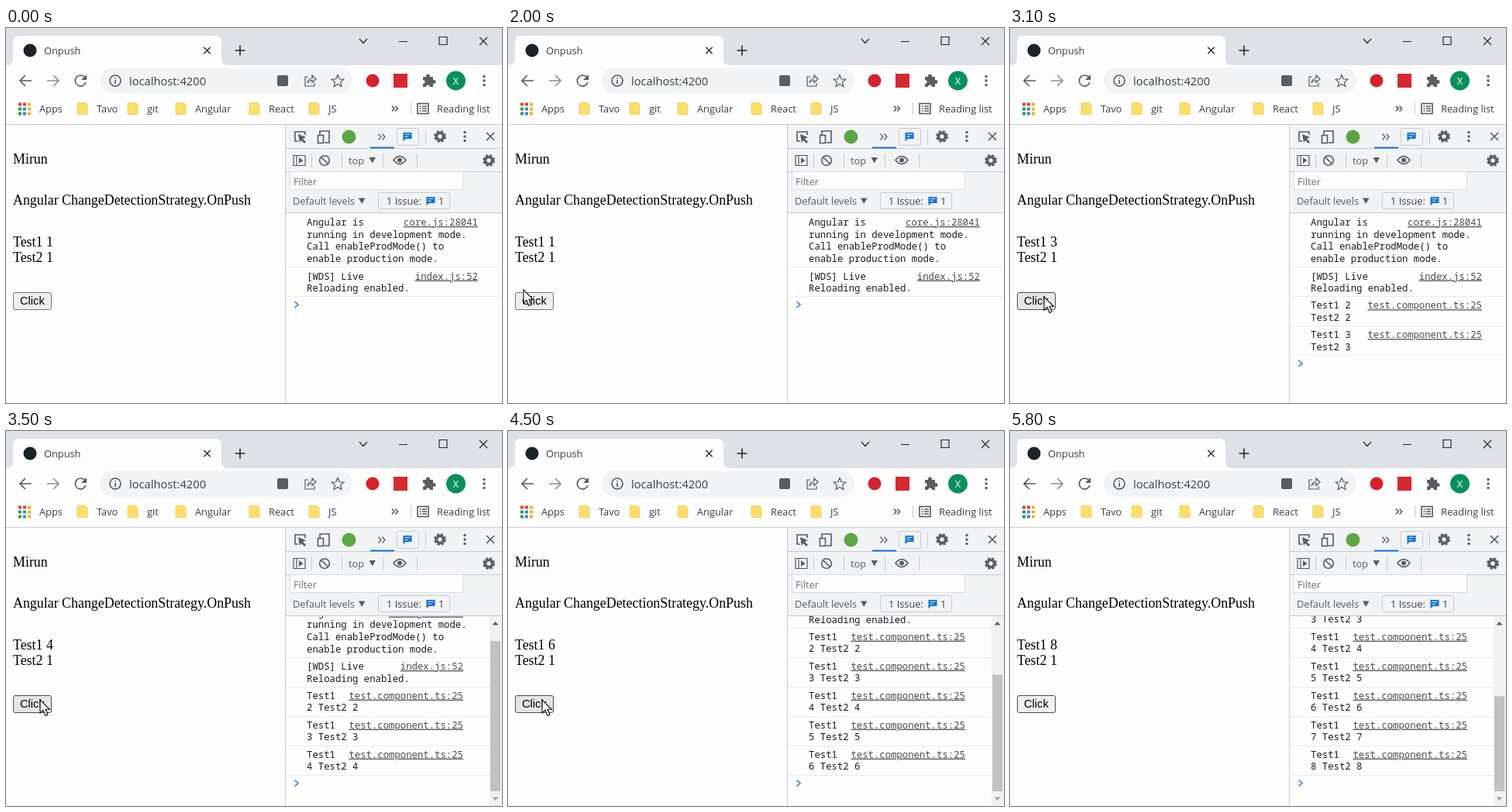
An HTML page that plays this animation: 640x484 px, repeating every 5.9 s.

```html
<!DOCTYPE html>
<html lang="en">
<head>
<meta charset="utf-8">
<title>Onpush</title>
<style>
  html, body { margin: 0; width: 100%; height: 100%; overflow: hidden; background: #fdfdfd; }
  svg { display: block; width: 640px; height: 484px; }
  text { white-space: pre; }
  .ui { font: 12.8px "Open Sans", "Noto Sans", sans-serif; fill: #3c4043; }
  .dev { fill: #5a5e63; }
  .page { font: 17.9px "Liberation Serif", "Times New Roman", serif; fill: #000; }
  .log { font: 12.3px "Noto Sans Mono", "DejaVu Sans Mono", monospace; fill: #1c1c20; }
  .link { fill: #4c4c52; text-anchor: end; text-decoration: underline; }
  .line { fill: none; stroke: #55595e; stroke-width: 1.6; }
  .thin { stroke-width: 1.2; }
  .dark { stroke: #26282c; }
  .pale { stroke: #8b8f94; }
  .rule { stroke: #c8cbd6; fill: none; }
  .fill { fill: #5a5e63; }
</style>
</head>
<body>
<svg viewBox="0 0 640 484">
  <defs>
    <path id="folder" d="M1 0H11V2H13V15H1Q0 15 0 14V1Q0 0 1 0Z" fill="#fbdf6c" stroke="#e8c95a" stroke-width=".8"/>
    <path id="chat" d="M0 0H12V9H4L0 12.5Z M2.5 2.8H9.5 M2.5 5.8H7" fill="#1a73c8" stroke="#f1f3f4" stroke-width=".9"/>
    <g id="gear">
      <circle r="6.3" fill="none" stroke="#5a5e63" stroke-width="3" stroke-dasharray="3.3 1.65"/>
      <circle r="4.4" fill="none" stroke="#5a5e63" stroke-width="3.4"/>
    </g>
    <g id="dots" class="fill"><circle cy="-5.5" r="1.7"/><circle r="1.7"/><circle cy="5.5" r="1.7"/></g>
    <path id="cross" d="M-5-5L5 5M5-5L-5 5"/>
    <clipPath id="consoleClip"><rect x="361" y="239" width="279" height="245"/></clipPath>
  </defs>

  <rect width="640" height="484" fill="#fdfdfd"/>

  <!-- Window frame and tab -->
  <rect width="640" height="48" fill="#dee1e6"/>
  <path d="M0 48Q9 48 9 40V18Q9 10 17 10H270Q278 10 278 18V40Q278 48 287 48Z" fill="#fdfdfd"/>
  <rect y="48" width="640" height="77" fill="#fdfdfd"/>
  <path class="rule" d="M0 124.5H640"/>
  <circle cx="31" cy="29" r="8.5" fill="#1c2328"/>
  <text class="ui" x="49" y="33.5">Onpush</text>
  <use href="#cross" class="line dark" transform="translate(259.5 29) scale(.84)"/>
  <path class="line dark" d="M295.5 29H308.5M302 22.5V35.5"/>
  <path class="line dark thin" d="M456 14L461 19.500L466 14M507 17.500H518M559 11.500H569V21.500H559Z"/>
  <use href="#cross" class="line dark thin" x="616" y="17"/>

  <!-- Address bar -->
  <path class="line" d="M33 68H18M25 61L18 68L25 75"/>
  <path class="line pale" d="M53 68H68M61 61L68 68L61 75"/>
  <path class="line" d="M102 64A7 7 0 1 0 103 70"/>
  <path class="fill" d="M104 60V67H97Z"/>
  <rect x="121" y="51.500" width="326" height="33" rx="16.500" fill="#f1f3f4"/>
  <circle class="line" cx="141" cy="68" r="7"/>
  <path class="line" d="M141 67V72M141 64V65.600"/>
  <text class="ui" style="font-size:14.700px" x="159" y="73.500">localhost:4200</text>
  <rect class="fill" x="350" y="61" width="14" height="14" rx="2"/>
  <path class="line thin" d="M390 63H386V75H398V71M389 71Q390 65 395 65V61L400 66L395 70.500V67.500Q391 67.500 389 71Z"/>
  <path class="line thin" d="M428 60.500L430.200 65.800L435.800 66.200L431.500 69.900L432.900 75.400L428 72.400L423.100 75.400L424.500 69.900L420.200 66.200L425.800 65.800Z"/>
  <circle cx="473" cy="68" r="8.500" fill="#d3222f"/>
  <rect x="500" y="59" width="18" height="18" fill="#d32a32"/>
  <path class="fill" d="M538 63H542V62A2.500 2.500 0 0 1 547 62V63H551V67H552A2.500 2.500 0 0 1 552 72H551V76H547A2.500 2.500 0 0 0 542 76H538V72A2.500 2.500 0 0 0 538 67Z"/>
  <circle cx="580.500" cy="68" r="12.500" fill="#0a8f5b"/>
  <text class="ui" x="580.500" y="72.500" text-anchor="middle" style="fill:#fff">X</text>
  <use href="#dots" x="617" y="68"/>

  <!-- Bookmarks -->
  <g id="apps"></g>
  <g id="bookmarks"></g>
  <path class="line" d="M498 100.500L501 104L498 107.500M502.500 100.500L505.500 104L502.500 107.500"/>
  <path class="rule" d="M522.500 96V112"/>
  <rect class="line" x="531" y="97.500" width="14" height="13"/>
  <path class="line" d="M533.500 101H535.500M537 101H543M533.500 104H535.500M537 104H543M533.500 107H535.500M537 107H543"/>
  <text class="ui" x="556" y="108.500">Reading list</text>

  <!-- Page -->
  <g class="page">
    <text x="9" y="175">Mirun</text>
    <text x="9" y="228">Angular ChangeDetectionStrategy.OnPush</text>
    <text id="count" x="9" y="282"></text>
    <text x="9" y="302">Test2 1</text>
  </g>
  <rect id="button" x="9.500" y="341.500" width="49" height="22" rx="2.500"/>
  <text x="18" y="357" style="font:14.670px 'Liberation Sans',Arial,sans-serif">Click</text>

  <!-- Developer tools -->
  <rect x="361" y="125" width="279" height="113" fill="#f1f3f4"/>
  <path class="rule" d="M360.500 125V484M361 155.500H640M361 185.500H640M361 238.500H640M541.500 131V150M394.500 162V180M433.500 162V180M486.500 162V180M530.500 162V180"/>
  <path class="line" d="M377 146H373V134H386V138"/>
  <path class="fill" d="M377 137L387 141L383 143L387 147L385 149L381 145L379 148Z"/>
  <path class="line" d="M405 139V133H417V148H411M402.500 138.500H409.500V148.500H402.500Z"/>
  <circle cx="442.500" cy="140.500" r="9" fill="#5da545"/>
  <path class="line thin" d="M480.500 136.500L484 140.500L480.500 144.500M485.500 136.500L489 140.500L485.500 144.500"/>
  <path d="M470 154.500H501" stroke="#1a73c8" stroke-width="2"/>
  <rect class="rule" x="504.500" y="129.500" width="28" height="22" rx="2"/>
  <use href="#chat" x="512" y="134.500"/>
  <use href="#gear" x="560" y="140"/>
  <use href="#dots" x="592" y="140"/>
  <use href="#cross" class="line" x="625" y="140"/>

  <path class="line thin" d="M371 164.500H386V177.500H371ZM375 164.500V177.500"/>
  <path class="fill" d="M378 167L383.500 171L378 175Z"/>
  <circle class="line" cx="411" cy="171" r="6.300"/>
  <path class="line" d="M406.500 166.500L415.500 175.500"/>
  <text class="ui dev" x="442" y="175.500">top</text>
  <path class="fill" d="M468.500 167H477L472.700 174.500Z"/>
  <path class="line" d="M500 170.500Q508 160.500 516 170.500Q508 180.500 500 170.500Z"/>
  <circle class="fill" cx="508" cy="170.500" r="3"/>
  <use href="#gear" x="623" y="171"/>

  <rect x="366.500" y="185.500" width="223" height="23" fill="#fdfdfd" stroke="#dcdee4"/>
  <text class="ui" style="fill:#6c7075" x="371" y="202.500">Filter</text>
  <text class="ui dev" x="370" y="228">Default levels</text>
  <path class="fill" d="M455 219.500H463.500L459.200 227Z"/>
  <rect class="rule" x="480.500" y="212.500" width="92" height="21" rx="2"/>
  <text class="ui" x="491" y="228">1 Issue:</text>
  <use href="#chat" x="542" y="217.500"/>
  <text class="ui" x="558" y="228">1</text>

  <g clip-path="url(#consoleClip)">
    <g id="log"></g>
    <g id="scrollbar">
      <rect x="624" y="239" width="16" height="245" fill="#f1f1f1"/>
      <path class="fill" d="M627.500 250.500H635.500L631.500 246Z"/>
      <path d="M627.500 472.500H635.500L631.500 477Z" fill="#a3a3a3"/>
      <rect id="thumb" x="625" width="13" fill="#c1c1c1"/>
    </g>
  </g>

  <path id="cursor" d="M0 0V17L4 13.300L7 20.500L10 19.200L7 12.300H12.300Z" fill="#fdfdfd" stroke="#111" stroke-width="1.100"/>
</svg>
<script>
  const LOOP = 5900, STEP = 100;
  const CLICKS = [2500, 3000, 3400, 3900, 4400, 4900, 5400];
  const PATH = [[800, 400, 225], [1200, 288, 290], [2000, 20, 338], [2300, 44, 347], [5500, 44, 347]];
  const BUTTON = { idle: ['#efefef', '#767676'], hover: ['#e5e5e5', '#4c4c4c'], used: ['#efefef', '#4c4c4c'] };
  const byId = id => document.getElementById(id);
  const set = (id, attrs) => Object.entries(attrs).forEach(([k, v]) => byId(id).setAttribute(k, v));

  const appColors = ['#dc4437', '#dc4437', '#e9b52b', '#2f9c58', '#4285d8', '#e9b52b', '#2f9c58', '#4285d8', '#e9b52b'];
  byId('apps').innerHTML = appColors.map((color, i) =>
    `<rect x="${16 + i % 3 * 6}" y="${96.5 + Math.floor(i / 3) * 6}" width="4" height="4" fill="${color}"/>`).join('');

  const bookmark = ([label, x]) => `<text class="ui" x="${x}" y="108.5">${label}</text>` +
    (label === 'Apps' ? '' : `<use href="#folder" x="${x - 25}" y="96.5"/>`);
  byId('bookmarks').innerHTML =
    [['Apps', 43], ['Tavo', 117], ['git', 182], ['Angular', 244], ['React', 339], ['JS', 416]].map(bookmark).join('');

  function entry(top, lines, link, right) {
    const baseline = top + 15.5;
    const rows = lines.map((line, i) => `<text class="log" x="388" y="${baseline + i * 15.7}">${line}</text>`).join('');
    const bottom = Math.round(top + lines.length * 15.7 + 6) + .5;
    return rows + `<text class="log link" x="${right}" y="${baseline}">${link}</text>` +
      `<path d="M361 ${bottom}H640" stroke="#e9e9f3"/>`;
  }

  function drawLog(count) {
    const scrolled = count >= 4;
    const right = scrolled ? 590 : 609;
    const shift = scrolled ? (count - 4) * 38 + 16.5 : 0;
    let html = entry(239.5 - shift, ['Angular is', 'running in development mode.',
      'Call enableProdMode() to', 'enable production mode.'], 'core.js:28041', right);
    html += entry(309 - shift, ['[WDS] Live', 'Reloading enabled.'], 'index.js:52', right);
    for (let n = 2; n <= count; n++) {
      const lines = scrolled ? ['Test1', `${n} Test2 ${n}`] : [`Test1 ${n}`, `Test2 ${n}`];
      html += entry(346.7 + (n - 2) * 38 - shift, lines, 'test.component.ts:25', right);
    }
    const promptY = 357 + (count - 1) * 38 - shift;
    html += `<path d="M372.500 ${promptY - 4}L377 ${promptY}L372.500 ${promptY + 4}" fill="none" stroke="#3878d8" stroke-width="1.600"/>`;
    byId('log').innerHTML = html;

    set('scrollbar', { visibility: scrolled ? 'visible' : 'hidden' });
    const height = 207 * 246 / (246 + shift);
    set('thumb', { y: 465 - height, height });
  }

  function cursorAt(t) {
    const i = PATH.findIndex(([time]) => time > t);
    if (i < 1) return null;
    const [t0, x0, y0] = PATH[i - 1], [t1, x1, y1] = PATH[i];
    const u = (t - t0) / (t1 - t0);
    return [x0 + (x1 - x0) * u, y0 + (y1 - y0) * u];
  }

  let shownCount = 0;
  function render(now) {
    const t = Math.floor(now % LOOP / STEP) * STEP;
    const count = 1 + CLICKS.filter(time => time <= t).length;
    if (count !== shownCount) {
      shownCount = count;
      byId('count').textContent = `Test1 ${count}`;
      drawLog(count);
    }
    const pos = cursorAt(t);
    set('cursor', pos
      ? { visibility: 'visible', transform: `translate(${pos[0]} ${pos[1]})` }
      : { visibility: 'hidden' });
    const hover = pos && pos[0] < 59 && pos[1] > 341;
    const [fill, stroke] = BUTTON[hover ? 'hover' : count > 1 ? 'used' : 'idle'];
    set('button', { fill, stroke });
  }

  const start = performance.now();
  function tick() {
    render(performance.now() - start);
    requestAnimationFrame(tick);
  }
  tick();
</script>
</body>
</html>
```
